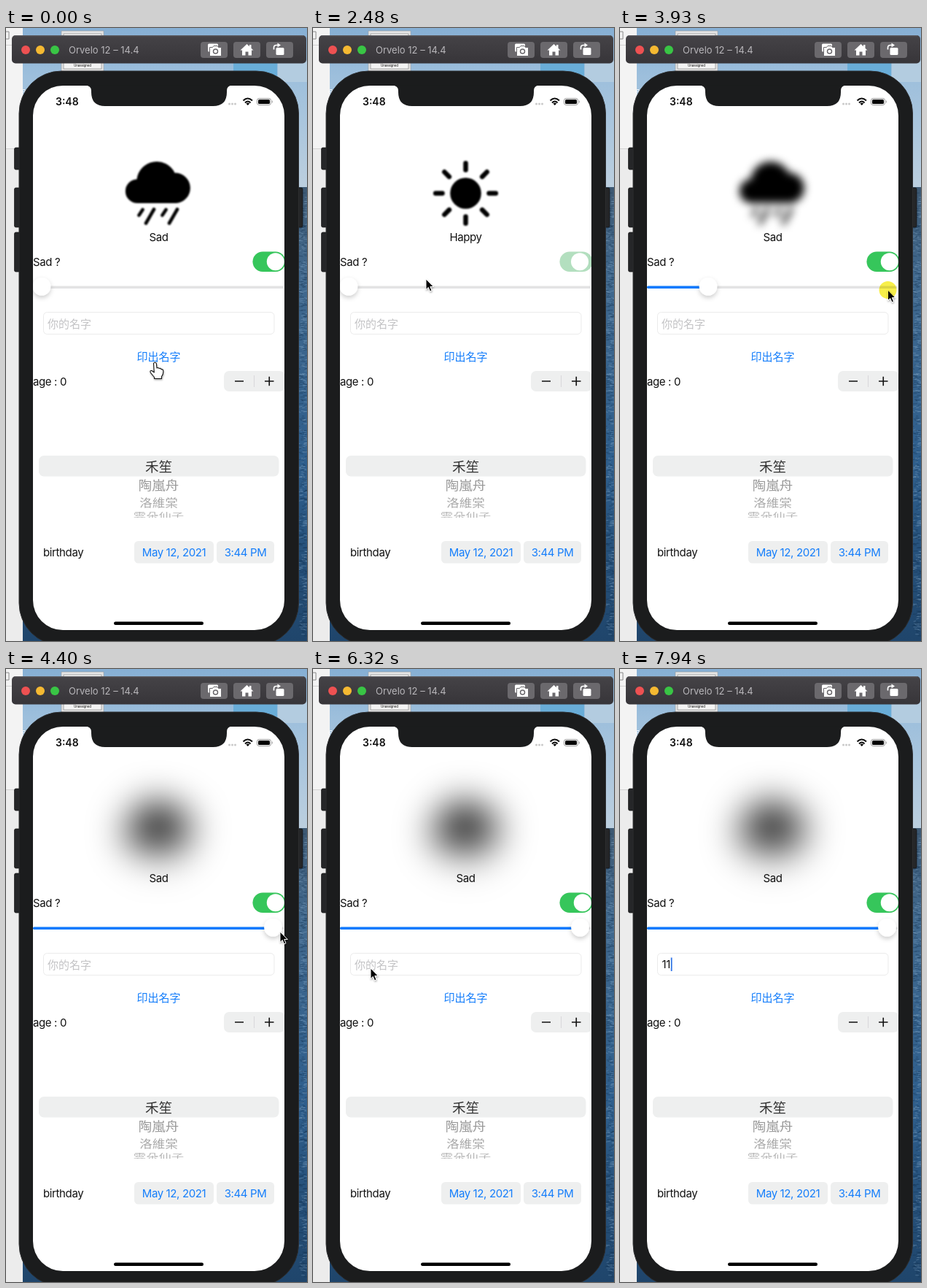
Animation, 413 px wide and 840 px high, one loop 8 s. Source, as an HTML page:

```html
<!DOCTYPE html>
<html lang="zh-Hant">
<head>
<meta charset="utf-8">
<title>Mood form</title>
<style>
  html, body { margin: 0; width: 100%; height: 100%; overflow: hidden; background: #ececec; }
  svg { display: block; width: 100vw; height: 100vh; }
  text { font: 15px Inter, "Noto Sans CJK TC", "Noto Sans CJK", sans-serif; letter-spacing: -.025em; fill: #111; white-space: pre; }
  .mid { text-anchor: middle; }
  .blue { fill: #157efb; }
  .cell { fill: #eeefef; }
  .picker text { font-size: 18.5px; letter-spacing: 0; text-anchor: middle; }
  .line { fill: none; stroke-linecap: round; stroke-linejoin: round; }
  #press { mix-blend-mode: multiply; }
</style>
</head>
<body>
<svg viewBox="0 0 413 840" preserveAspectRatio="none">
  <defs>
    <linearGradient id="sky" x2="0" y2="1">
      <stop offset="0" stop-color="#86afd4"/><stop offset=".3" stop-color="#9dbfdc"/><stop offset="1" stop-color="#bccfdf"/>
    </linearGradient>
    <linearGradient id="sea" x2="0" y2="1">
      <stop offset="0" stop-color="#3d5872"/><stop offset=".2" stop-color="#41698e"/><stop offset=".6" stop-color="#2f5f8d"/><stop offset="1" stop-color="#1f456b"/>
    </linearGradient>
    <linearGradient id="bar" x2="0" y2="1">
      <stop offset="0" stop-color="#454347"/><stop offset="1" stop-color="#373539"/>
    </linearGradient>
    <filter id="soft" filterUnits="userSpaceOnUse" x="80" y="90" width="260" height="260">
      <feGaussianBlur id="blur" stdDeviation="1"/>
    </filter>
    <filter id="shade" x="-60%" y="-60%" width="220%" height="220%">
      <feDropShadow dx="0" dy="3" stdDeviation="3" flood-opacity=".2"/>
    </filter>
    <filter id="tipShade" x="-60%" y="-60%" width="220%" height="220%">
      <feDropShadow dx=".5" dy="1.5" stdDeviation="1" flood-opacity=".35"/>
    </filter>
    <clipPath id="screen"><rect x="37" y="79" width="345" height="746" rx="41"/></clipPath>
    <clipPath id="wheel"><rect x="45" y="560" width="329" height="111"/></clipPath>
  </defs>

  <!-- desktop -->
  <rect width="413" height="220" fill="url(#sky)"/>
  <rect y="218" width="413" height="622" fill="url(#sea)"/>
  <path id="crests" class="line" stroke="#86a9c6" stroke-opacity=".4"/>
  <path id="troughs" class="line" stroke="#0f2d4c" stroke-opacity=".4"/>
  <rect x="312" y="44" width="60" height="30" fill="#69add8"/>
  <rect x="373" y="44" width="40" height="30" fill="#b3cce0"/>
  <rect width="23" height="840" fill="#ececec"/>
  <rect width="23" height="165" fill="#f3f3f3"/>
  <path d="M0 23.500H8M0 165.500H18" stroke="#d2d2d2"/>
  <path d="M0 5h4v10h-4" class="line" stroke="#888"/>
  <text x="21" y="91" style="font-size:12px;fill:#fff">e</text>
  <rect x="76" y="4" width="58" height="56" fill="#e4e4e4" stroke="#999" stroke-width=".6"/>
  <rect x="79" y="8" width="52" height="48" fill="#f3f3f3" stroke="#777" stroke-width=".6"/>
  <text x="105" y="53" class="mid" style="font-size:4.500px">Unassigned</text>

  <!-- window bar -->
  <rect x="8" y="10" width="404" height="38.500" rx="5" fill="url(#bar)"/>
  <path d="M12 10.800H408" stroke="#626064" stroke-width="1"/>
  <circle cx="27" cy="30" r="6" fill="#ee5152"/>
  <circle cx="47" cy="30" r="6" fill="#f5b932"/>
  <circle cx="67" cy="30" r="6" fill="#39c545"/>
  <text x="86" y="35" style="font-size:13px;letter-spacing:0;fill:#b8b6ba">Orvelo 12 – 14.4</text>
  <g fill="#6b696d">
    <rect x="267" y="19" width="37" height="22" rx="4"/>
    <rect x="312" y="19" width="37" height="22" rx="4"/>
    <rect x="357" y="19" width="37" height="22" rx="4"/>
  </g>
  <g fill="#fff">
    <rect x="277" y="21.500" width="14" height="11" rx="1.500"/>
    <path d="M279.500 26.500h4l1.500-2h5l1.500 2h4v12h-16z" stroke="#6b696d"/>
    <circle cx="287.500" cy="32" r="3" fill="none" stroke="#6b696d" stroke-width="1.500"/>
    <path d="M321.500 30.500l9-8.500 3.500 3.300V23h2.500v4.800l3 2.700h-2.500V37.500h-4.500v-5h-4v5H324v-7z"/>
    <rect x="370.500" y="27" width="11" height="10" rx="1.500"/>
    <path d="M367.500 29.500V27q0-3.500 3.500-3.500h2" fill="none" stroke="#fff" stroke-width="1.700"/>
    <path d="M372.500 20.500l4.500 3-4.500 3z"/>
  </g>

  <!-- device -->
  <g fill="#252628" stroke="#111" stroke-width=".7">
    <rect x="11.500" y="164" width="9" height="30" rx="2"/>
    <rect x="11.500" y="219" width="9" height="54" rx="2"/>
    <rect x="11.500" y="280" width="9" height="54" rx="2"/>
    <rect x="399" y="219" width="8" height="54" rx="2"/>
  </g>
  <rect x="18" y="59" width="383.500" height="787" rx="58" fill="#1b1c1d" stroke="#2c2d2f"/>
  <rect x="37" y="79" width="345" height="746" rx="41" fill="#fff"/>
  <path d="M109 78.500H310Q303 79 303 86V88Q303 107 284 107H136Q117 107 117 88V86Q117 79 109 78.500Z" fill="#1b1c1d"/>
  <text x="68" y="106" style="font-size:14px;font-weight:600;letter-spacing:0">3:48</text>
  <path d="M306.500 104h12" class="line" stroke="#c9c9c9" stroke-width="3" stroke-dasharray="0 4"/>
  <path d="M325.500 99.500Q331.500 93.500 338 99.500M328 102.500Q331.800 98.500 335.500 102.500" fill="none" stroke="#111" stroke-width="2"/>
  <path d="M329.500 103.500q2.300-1.800 4.600 0l-2.300 2.500z"/>
  <rect x="344.500" y="96.500" width="19" height="9" rx="2.700" fill="none" stroke="#999"/>
  <rect x="346" y="98" width="16" height="6" rx="1.500"/>
  <path d="M365 99q2 2 0 4z" fill="#999"/>

  <g clip-path="url(#screen)">
    <g filter="url(#soft)">
      <g id="cloud">
        <path d="M181 240A16.200 16.200 0 0 1 179.500 207.300A27.500 27.500 0 0 1 231.500 198.500A20.800 20.800 0 0 1 234 240Z"/>
        <path class="line" stroke="#000" stroke-width="4.600" d="M187.500 249l-5 7.500M203 248.500l-11 19M219.500 249l-5 7.500M235 248.500l-11 19"/>
      </g>
      <g id="sun">
        <circle cx="209.500" cy="226.500" r="21.300"/>
        <path id="rays" class="line" stroke="#000" stroke-width="6.500"/>
      </g>
    </g>
    <text id="mood" class="mid" x="209.500" y="292">Sad</text>

    <text x="37" y="326">Sad ?</text>
    <rect x="338.500" y="306.500" width="45" height="27.500" rx="13.750" fill="#e9e9ea"/>
    <rect id="track" x="338.500" y="306.500" width="45" height="27.500" rx="13.750" fill="#36c65b"/>
    <circle id="knob" cy="320.200" r="12" fill="#fff"/>

    <rect x="37" y="353.500" width="344" height="3.500" rx="1.700" fill="#e3e3e4"/>
    <rect id="level" x="37" y="353.500" height="3.500" rx="1.700" fill="#0a7aff"/>
    <circle id="thumb" cy="354.300" r="12.300" fill="#fff" filter="url(#shade)"/>

    <rect x="51.500" y="389.500" width="316.500" height="30" rx="5" fill="#fff" stroke="#ebebeb"/>
    <text id="hint" x="57" y="410.500" style="letter-spacing:0;fill:#c3c3c5">你的名字</text>
    <text id="typed" x="57.500" y="410"></text>
    <rect id="caret" y="395.500" width="1.800" height="18.500" fill="#2f74e8"/>

    <text class="mid blue" x="209.500" y="455.500" style="letter-spacing:0">印出名字</text>
    <text x="37" y="490">age : 0</text>
    <rect class="cell" x="299" y="470" width="83.500" height="28" rx="7"/>
    <path d="M314 484h12M355 484h12.500M361.250 477.800v12.500" stroke="#111" stroke-width="1.600"/>
    <path d="M340.500 476v16" stroke="#d8d8da"/>

    <rect class="cell" x="45" y="586" width="329.500" height="28.500" rx="7"/>
    <g class="picker" clip-path="url(#wheel)">
      <text x="209.500" y="607.500" style="fill:#333">禾笙</text>
      <text transform="translate(209.500 633) scale(1 .94)" style="fill:#999">陶嵐舟</text>
      <text transform="translate(209.500 655.500) scale(.95 .78)" style="fill:#a8a8a8">洛維棠</text>
      <text transform="translate(209.500 672) scale(.94 .56)" style="fill:#b5b5b5">雲朵仙子</text>
    </g>

    <text x="51" y="724">birthday</text>
    <rect class="cell" x="176" y="703" width="109" height="30.500" rx="5.500"/>
    <rect class="cell" x="289" y="703" width="79" height="30.500" rx="5.500"/>
    <text class="mid blue" x="230.500" y="724">May 12, 2021</text>
    <text class="mid blue" x="328.500" y="724">3:44 PM</text>
    <rect x="148" y="813.500" width="123" height="4.500" rx="2.250"/>
  </g>

  <path id="arrow" d="M0 0V14.500L3.300 11.400L5.500 16.800L8 15.800L5.800 10.500H10.300Z" stroke="#fff" stroke-width="1" filter="url(#tipShade)"/>
  <path id="hand" class="line" d="M-2.500 1.500Q-.5-1 1.300 1.500L2 8Q3.800 6.800 5 8.500Q6.800 7.500 8 9.700Q10.800 9 10.800 13Q10.800 17 8.500 19.500V22.500H-1.500V20.500Q-4.500 17-6.800 14Q-7.800 11-5 11.500L-1.700 14Z" style="fill:#fff" stroke="#111" stroke-width="1.100" filter="url(#tipShade)"/>
  <circle id="press" r="12" fill="#f7ef4a"/>
</svg>

<script>
const LOOP = 8000;
const part = Object.fromEntries([...document.querySelectorAll('[id]')].map(e => [e.id, e]));
const show = (el, on) => el.style.display = on ? '' : 'none';
const within = (t, from, to) => t >= from && t < to;

// keys: [time, value, value, ...]
function track(keys, t) {
  if (t <= keys[0][0]) return keys[0].slice(1);
  const i = keys.findIndex(k => k[0] > t);
  if (i < 0) return keys.at(-1).slice(1);
  const [a, b] = [keys[i - 1], keys[i]];
  const u = (t - a[0]) / (b[0] - a[0]);
  const eased = u * u * (3 - 2 * u);
  return a.slice(1).map((v, n) => v + (b[n + 1] - v) * eased);
}

const pointerPath = [
  [70, 205, 458], [200, 184, 440], [730, 361, 309], [800, 359, 320], [1130, 359, 320], [1270, 363, 327],
  [1560, 363, 327], [1800, 325, 429], [2000, 235, 402], [2200, 190, 362], [2480, 155, 344], [2970, 52, 356],
  [3100, 52, 356], [3860, 367, 359], [3930, 367.5, 359], [4060, 383, 360], [4140, 376, 360], [4620, 376, 360],
  [5150, 170, 406], [5290, 161, 408], [5440, 161, 408], [6250, 80, 410], [6320, 79, 410],
  [6540, 79, 410], [6650, 87, 408], [6860, 87, 408]
];
const switchPath = [[1500, 369.8, 1], [1800, 352.2, 0], [2340, 352.2, 0], [2480, 366, .3], [2640, 369.8, 1]];
const thumbPath = [[3250, 49], [3860, 121], [3940, 121], [4140, 366.5]];
const blurPath = [[3250, 1], [3860, 6], [4340, 6], [4400, 26]];

function render(t) {
  const [x, y] = track(pointerPath, t);
  for (const el of [part.arrow, part.hand, part.press]) el.setAttribute('transform', `translate(${x} ${y})`);
  show(part.hand, t < 200);
  show(part.arrow, within(t, 200, 7060));
  show(part.press, within(t, 1470, 1600) || within(t, 3080, 4390) || within(t, 6580, 6800));

  const happy = within(t, 1540, 2620);
  show(part.sun, happy);
  show(part.cloud, !happy);
  part.mood.textContent = happy ? 'Happy' : 'Sad';

  const [knobX, green] = track(switchPath, t);
  part.knob.setAttribute('cx', knobX);
  part.track.setAttribute('fill-opacity', green);

  const [thumbX] = track(thumbPath, t);
  part.thumb.setAttribute('cx', thumbX);
  part.level.setAttribute('width', thumbX - 37);
  part.blur.setAttribute('stdDeviation', track(blurPath, t)[0]);

  const typed = '1'.repeat((t >= 7060) + (t >= 7660));
  part.typed.textContent = typed;
  show(part.hint, !typed);
  show(part.caret, t >= 6650);
  part.caret.setAttribute('x', 57.5 + (typed ? part.typed.getComputedTextLength() + .8 : 0));
}

part.rays.setAttribute('d', Array.from({ length: 8 }, (_, i) => {
  const at = r => `${209.5 + r * Math.cos(i * Math.PI / 4)} ${226.5 + r * Math.sin(i * Math.PI / 4)}`;
  return `M${at(32)}L${at(41.3)}`;
}).join(''));

let seed = 7;
const random = () => (seed = seed * 16807 % 2147483647) / 2147483647;
const ripples = count => Array.from({ length: count }, () =>
  `M${401 + random() * 10} ${225 + random() * 615}l${2 + random() * 4} ${random() * 2 - 1}`).join('');
part.crests.setAttribute('d', ripples(260));
part.troughs.setAttribute('d', ripples(260));

function frame() {
  render(performance.now() % LOOP);
  requestAnimationFrame(frame);
}
frame();
</script>
</body>
</html>
```
